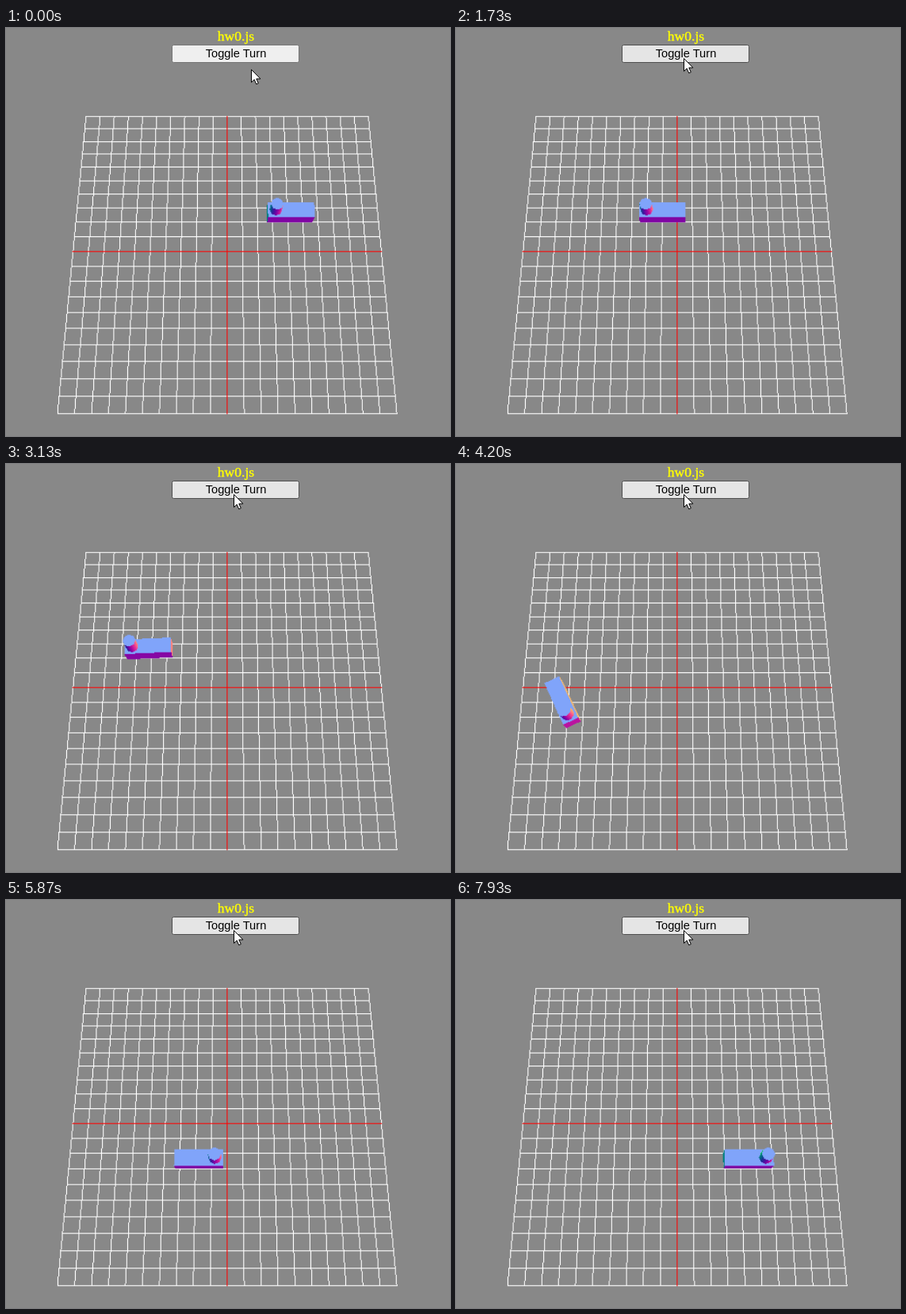
Write an HTML page with a canvas that moves like this. It is 560 px wide and 515 px high and loops after 8 s.

```html
<!DOCTYPE html>
<html lang="en">
<head>
<meta charset="utf-8">
<title>hw0.js</title>
<style>
  html, body { margin: 0; width: 100%; height: 100%; overflow: hidden; background: #888; }
  canvas, svg { position: absolute; left: 0; top: 0; }
  /* The scene is rendered small and enlarged by the page zoom of 110% */
  canvas { width: 561px; height: 517px; }
  .title { font: 17.6px "Liberation Serif", "Times New Roman", serif; fill: #ff0; stroke: #ff0; stroke-width: .4; }
  .label { font: 14.667px "Liberation Sans", Arial, sans-serif; fill: #000; }
</style>
</head>
<body>
<canvas id="grid" width="510" height="470"></canvas>
<canvas id="car" width="510" height="470"></canvas>
<svg width="560" height="515" viewBox="0 0 560 515">
  <text class="title" x="290" y="16" text-anchor="middle">hw0.js</text>
  <rect id="button" x="209.5" y="21.5" width="160" height="22" rx="2"/>
  <text class="label" x="290" y="36.6" text-anchor="middle">Toggle Turn</text>
  <path id="cursor" d="M.5 .5V16.6L4.2 13.1L6.7 18.9L9.3 17.8L6.8 12.1H11.9Z" fill="#fff" stroke="#000"/>
</svg>
<script>
const $ = id => document.getElementById(id);
const LOOP = 8000;
const gridCtx = $('grid').getContext('2d');
const carCtx = $('car').getContext('2d');

// Camera at (0, 30, 9) looking at the origin
const CX = 253.6, CY = 256.2, FOCAL = 553.5;
const DIST = Math.hypot(30, 9), SIN = 30 / DIST, COS = 9 / DIST;

function project(x, y, z) {
  const k = FOCAL / (DIST - z * COS - y * SIN);
  return [CX + x * k, CY + (z * SIN - y * COS) * k];
}

const mix = (a, b, t) => [a[0] + (b[0] - a[0]) * t, a[1] + (b[1] - a[1]) * t];

// Lines and polygons are filled by whole pixels, without antialiasing
function drawLine(a, b, color) {
  const steps = Math.ceil(Math.max(Math.abs(b[0] - a[0]), Math.abs(b[1] - a[1])));
  gridCtx.fillStyle = color;
  for (let i = 0; i <= steps; i++) {
    const [x, y] = mix(a, b, i / steps).map(Math.floor);
    gridCtx.fillRect(x, y, 1, 1);
  }
}

function fillConvex(points, color) {
  const ys = points.map(p => p[1]);
  const bottom = Math.max(...ys);
  carCtx.fillStyle = color;
  for (let y = Math.ceil(Math.min(...ys) - 0.5); y + 0.5 < bottom; y++) {
    const xs = [];
    points.forEach((a, i) => {
      const b = points[(i + 1) % points.length];
      const t = (y + 0.5 - a[1]) / (b[1] - a[1]);
      if (t >= 0 && t <= 1) xs.push(mix(a, b, t)[0]);
    });
    const left = Math.ceil(Math.min(...xs) - 0.5), right = Math.ceil(Math.max(...xs) - 0.5);
    carCtx.fillRect(left, y, right - left, 1);
  }
}

// Colour of a surface from its normal in view space
function normalColor(x, y, z) {
  const len = Math.hypot(x, y, z);
  const view = [x, y * COS - z * SIN, y * SIN + z * COS];
  return `rgb(${view.map(v => Math.round((v / len + 1) * 127.5))})`;
}

const TOP_COLOR = normalColor(0, 1, 0);

function facesCamera(points) {
  return points.reduce((area, [x, y], i) => {
    const [nx, ny] = points[(i + 1) % points.length];
    return area + x * ny - nx * y;
  }, 0) > 0;
}

// Upright solid over a ring of ground points; a centre gives it smooth shading
function drawPrism(ring, bottom, top, center) {
  const strips = center ? 6 : 1;
  ring.forEach((a, i) => {
    const b = ring[(i + 1) % ring.length];
    for (let s = 0; s < strips; s++) {
      const p = mix(a, b, s / strips), q = mix(a, b, (s + 1) / strips);
      const wall = [[p, bottom], [q, bottom], [q, top], [p, top]]
        .map(([[x, z], y]) => project(x, y, z));
      if (!facesCamera(wall)) continue;
      const m = mix(p, q, 0.5);
      const normal = center ? [m[0] - center[0], m[1] - center[1]] : [b[1] - a[1], a[0] - b[0]];
      fillConvex(wall, normalColor(normal[0], 0, normal[1]));
    }
  });
  fillConvex(ring.map(([x, z]) => project(x, top, z)), TOP_COLOR);
}

// Straight to the left, half circle, straight to the right
const START_X = 4.13, TURN_X = -5, RADIUS = 2.5, RETURN_SPEED = 3;
const TURN_START = 3.105, TURN_END = 4.79;

function carPose(t) {
  if (t < TURN_START) {
    return { x: START_X + (TURN_X - START_X) * t / TURN_START, z: -RADIUS, angle: 0 };
  }
  if (t > TURN_END) {
    return { x: TURN_X + RETURN_SPEED * (t - TURN_END), z: RADIUS, angle: Math.PI };
  }
  const angle = Math.PI * (t - TURN_START) / (TURN_END - TURN_START);
  return { x: TURN_X - RADIUS * Math.sin(angle), z: -RADIUS * Math.cos(angle), angle };
}

function drawCar(t) {
  const { x, z, angle } = carPose(t);
  const dx = -Math.cos(angle), dz = Math.sin(angle);
  const place = (along, side) => [x + along * dx - side * dz, z + along * dz + side * dx];
  const body = [[1.5, 0.5], [-1.5, 0.5], [-1.5, -0.5], [1.5, -0.5]].map(p => place(...p));
  const tower = Array.from({ length: 8 }, (_, i) => {
    const a = i * Math.PI / 4;
    return place(1 + 0.4 * Math.cos(a), 0.4 * Math.sin(a));
  });
  carCtx.clearRect(0, 0, 510, 470);
  drawPrism(body, 0, 1);
  drawPrism(tower, 1, 2, place(1, 0));
}

function drawGrid() {
  const row = (z, color) => drawLine(project(-10, 0, z), project(10, 0, z), color);
  const column = (x, color) => drawLine(project(x, 0, -10), project(x, 0, 10), color);
  for (let i = -10; i <= 10; i++) {
    row(i, '#fff');
    column(i, '#fff');
  }
  row(0, '#f00');
  column(0, '#f00');
}

function drawPointer(t) {
  const p = Math.min(1, Math.max(0, (t - 0.13) / 0.47));
  const ease = p * p * (3 - 2 * p);
  const x = 309 - 22 * ease, y = 52 - 14 * ease;
  const hover = y < 44;
  $('cursor').setAttribute('transform', `translate(${Math.round(x)} ${Math.round(y)})`);
  $('button').setAttribute('fill', hover ? '#e5e5e5' : '#efefef');
  $('button').setAttribute('stroke', hover ? '#4f4f4f' : '#767676');
}

function frame() {
  const t = performance.now() % LOOP / 1000;
  drawCar(t);
  drawPointer(t);
  requestAnimationFrame(frame);
}

drawGrid();
frame();
</script>
</body>
</html>
```
